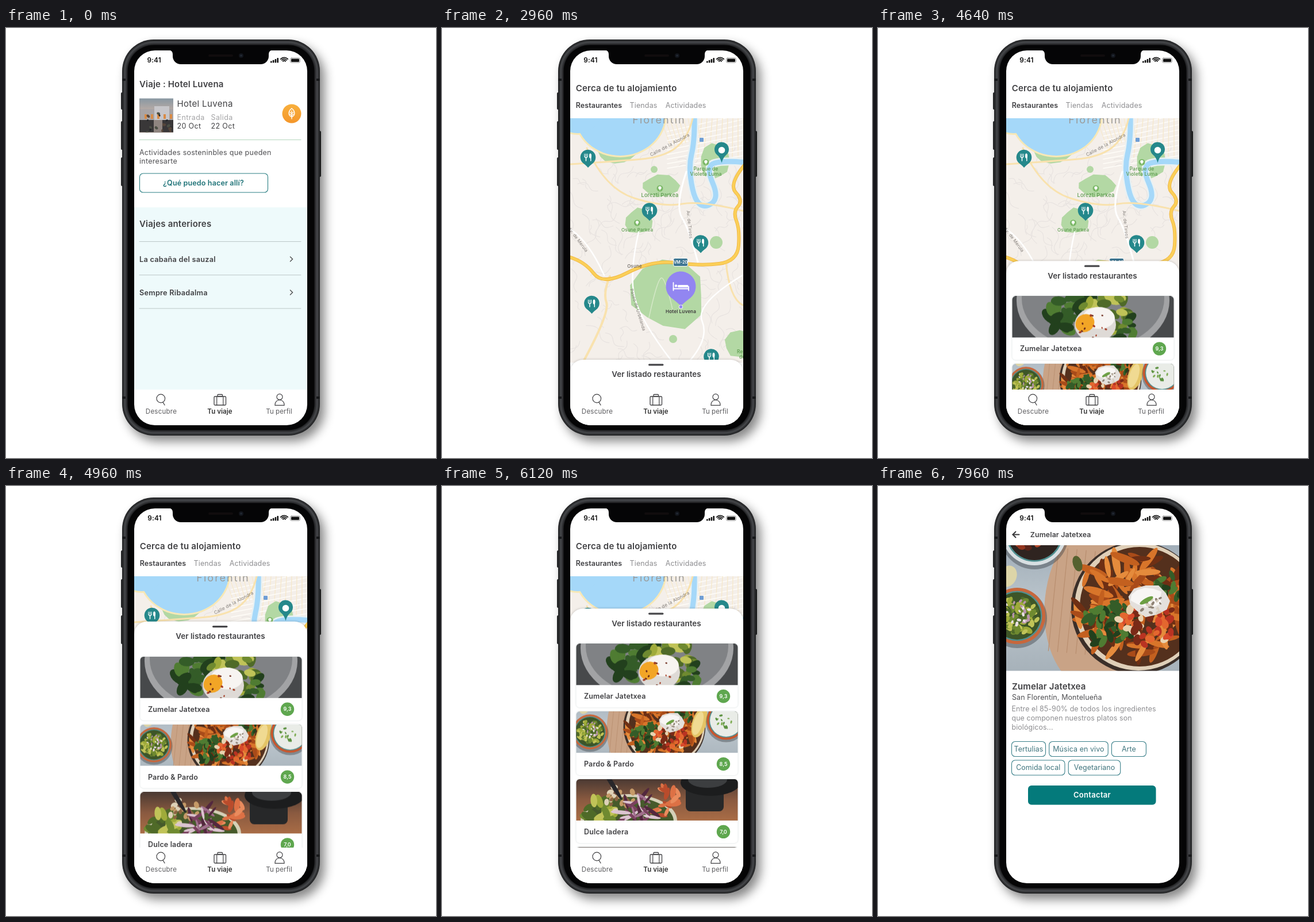
Recreate the animation shown at these times as an HTML page with a canvas. Size 748 by 748 pixels, loop 8000 ms.

```html
<!DOCTYPE html>
<html lang="es">
<head>
<meta charset="utf-8">
<title>Viaje</title>
<style>
html, body { margin: 0; width: 100%; height: 100%; overflow: hidden; background: #fff; }
canvas { display: block; width: 100vw; height: 100vh; }
</style>
</head>
<body>
<canvas id="stage" width="748" height="748"></canvas>
<script>
const SIZE = 748, LOOP = 8000, TAU = Math.PI * 2;
const LEFT = 223, TOP = 39, WIDTH = 301, HEIGHT = 652, RIGHT = LEFT + WIDTH;
const INK = '#414144', SOFT = '#505053', GREY = '#8e8e91', TEAL = '#1f7378';
const HOTEL = 'Hotel Luvena', PLACE = 'Zumelar Jatetxea';
let c = document.getElementById('stage').getContext('2d');

// ---------- helpers ----------
function layer(draw) {
  const canvas = document.createElement('canvas');
  canvas.width = canvas.height = SIZE;
  const previous = c;
  c = canvas.getContext('2d');
  c.lineCap = 'round';
  draw();
  c = previous;
  return canvas;
}
function scoped(draw) { c.save(); draw(); c.restore(); }
function seeded(seed) {
  let s = Math.floor(seed * 7919) % 2147483647;
  return () => (s = (s * 16807) % 2147483647) / 2147483647;
}
function text(s, x, y, size, color = INK, weight = 400, align = 'left', spacing = 0.15) {
  c.font = `${weight} ${size}px Inter, sans-serif`;
  c.letterSpacing = spacing + 'px';
  c.textAlign = align;
  c.fillStyle = color;
  c.fillText(s, x, y);
}
function fill(color) { c.fillStyle = color; c.fill(); }
function stroke(color, width) { c.strokeStyle = color; c.lineWidth = width; c.stroke(); }
function rect(x, y, w, h, color) { c.fillStyle = color; c.fillRect(x, y, w, h); }
function box(x, y, w, h, r) { c.beginPath(); c.roundRect(x, y, w, h, r); }
function arc(x, y, r, from = 0, to = TAU) { c.beginPath(); c.arc(x, y, r, from, to); }
function disc(x, y, r, color) { arc(x, y, r); fill(color); }
function oval(x, y, rx, ry, color, turn = 0) {
  c.beginPath(); c.ellipse(x, y, rx, ry, turn, 0, TAU); fill(color);
}
function line(x1, y1, x2, y2, color, width) {
  c.beginPath(); c.moveTo(x1, y1); c.lineTo(x2, y2); stroke(color, width);
}
function chevron(x, y, size, side, color, width) {
  c.beginPath();
  c.moveTo(x - side * size, y - size); c.lineTo(x, y); c.lineTo(x - side * size, y + size);
  stroke(color, width);
}
function shade(y1, y2, ...colors) {
  const g = c.createLinearGradient(0, y1, 0, y2);
  colors.forEach((color, i) => g.addColorStop(i / (colors.length - 1), color));
  return g;
}
// Smooth line through the key points' midpoints; points read "x,y x,y ...".
function road(points, color, width) {
  const p = points.split(' ').map(s => s.split(',').map(Number));
  const last = p.length - 1;
  c.beginPath();
  c.moveTo(...p[0]);
  for (let i = 1; i < last; i++) {
    const next = p[i + 1];
    const end = i + 1 === last ? next : [(p[i][0] + next[0]) / 2, (p[i][1] + next[1]) / 2];
    c.quadraticCurveTo(...p[i], ...end);
  }
  stroke(color, width);
}
function blob(x, y, rx, ry, color) {
  const rnd = seeded(x + y), corners = 11;
  c.beginPath();
  for (let i = 0; i < corners; i++) {
    const a = i / corners * TAU, k = 0.85 + rnd() * 0.3;
    c.lineTo(x + Math.cos(a) * rx * k, y + Math.sin(a) * ry * k);
  }
  fill(color);
}
// Seeded pile of slivers around a point, flattened a little.
function scatter(n, x, y, reach, size, slim, colors) {
  const rnd = seeded(n + x + y);
  for (let i = 0; i < n; i++) {
    const a = rnd() * TAU, d = Math.sqrt(rnd()) * reach, k = size * (0.6 + rnd() * 0.5);
    oval(x + Math.cos(a) * d, y + Math.sin(a) * d * 0.85, k, k * slim,
      colors[i % colors.length], rnd() * Math.PI);
  }
}

// ---------- phone ----------
function drawPhone() {
  rect(0, 0, SIZE, SIZE, '#fff');
  const side = '#28292b';
  box(200, 112, 5, 30, 2); fill(side);
  for (const y of [162, 225]) { box(200, y, 5, 50, 2); fill(side); }
  box(543, 179, 5, 80, 2); fill(side);
  scoped(() => {
    c.shadowColor = 'rgba(0,0,0,.48)';
    c.shadowBlur = 18;
    c.shadowOffsetX = 8;
    c.shadowOffsetY = 10;
    box(202, 20, 344, 689, 55); fill('#232426');
  });
  ['#303133', '#45474a', '#38393c', '#262729', '#050506'].forEach((color, i) => {
    const inset = 1.5 + i * 2;
    box(202 + inset, 20 + inset, 344 - inset * 2, 689 - inset * 2, 55 - inset); fill(color);
  });
  for (const y of [88, 641]) for (const x of [202, 540]) rect(x, y, 6, 4, '#17181a');
}
function drawNotch() {
  c.beginPath();
  c.moveTo(283, 38);
  c.quadraticCurveTo(290, 39, 290, 46);
  c.arcTo(290, 63, 307, 63, 14);
  c.arcTo(457, 63, 457, 46, 14);
  c.lineTo(457, 46);
  c.quadraticCurveTo(457, 39, 464, 38);
  fill('#050506');
  box(352, 46, 43, 4, 2); fill('#100c0d');
  disc(409, 48, 4, '#12151b');
  disc(409, 48, 1.8, '#232a35');
}
function drawStatus(x) {
  text('9:41', x, 60, 11.8, '#111', 600);
  for (let i = 0; i < 4; i++) { box(460 + i * 3.8, 57.5 - i * 1.8, 2.6, 3 + i * 1.8, 0.8); fill('#111'); }
  for (const r of [3.2, 5.9, 8.6]) { arc(484, 60, r, -Math.PI * 0.76, -Math.PI * 0.24); stroke('#111', 1.7); }
  box(494.6, 52.2, 16.8, 8, 2.2); stroke('#777', 0.8);
  box(496, 53.5, 14, 5.4, 1.2); fill('#111');
}
function drawNav() {
  rect(LEFT, 629, WIDTH, 62, '#fff');
  arc(269.3, 644.5, 7.3); stroke(INK, 1.2);
  line(273, 651, 276, 656, INK, 1.3);
  box(362, 641, 20.5, 15, 1.5); stroke(INK, 1.3);
  box(368, 637.5, 8.5, 3.5, 1); stroke(INK, 1.3);
  for (const x of [366.7, 377.8]) line(x, 641, x, 656, INK, 1.2);
  arc(476, 641.7, 5); stroke(INK, 1.2);
  box(468, 647, 16, 9.3, [8, 8, 0, 0]); stroke(INK, 1.2);
  text('Descubre', 270, 671, 11.5, '#5c5c5f', 400, 'center', 0.25);
  text('Tu viaje', 372, 671, 11.5, '#333', 600, 'center', 0.05);
  text('Tu perfil', 475, 671, 11.5, '#5c5c5f', 400, 'center', 0.1);
}

// ---------- home ----------
function drawHotelPhoto() {
  scoped(() => {
    box(232, 122.5, 59, 59, 0); c.clip();
    rect(232, 122, 59, 60, shade(122, 160, '#8797a2', '#b3a9a5', '#d8a987'));
    rect(232, 141, 59, 22, '#a8a4a5');
    rect(258, 136, 26, 27, '#c7c6ca');
    for (let x = 241; x < 290; x += 11) rect(x, 150, 4, 8, '#d98b45');
    rect(232, 160, 59, 22, '#393738');
    rect(257, 160, 15, 22, '#8f8580');
    scatter(18, 262, 172, 28, 3, 0.7, ['#24272a', '#57463a', '#4c5045']);
  });
}
function drawBadge(x, y) {
  disc(x, y, 16.5, shade(y - 17, y + 17, '#f8b03d', '#f4962a'));
  for (const side of [-1, 1]) {
    c.beginPath();
    c.moveTo(x, y - 9);
    c.bezierCurveTo(x + side * 7, y - 4, x + side * 6, y + 4, x, y + 5.5);
    stroke('#fff', 1.4);
    for (const d of [0, 3.5]) line(x, y + d, x + side * 3.5, y + d - 3, '#fff', 1.1);
  }
  line(x, y - 5, x, y + 9, '#fff', 1.3);
}
function drawHome() {
  rect(LEFT, TOP, WIDTH, HEIGHT, '#fff');
  rect(LEFT, 312, WIDTH, 320, '#eefafb');
  drawStatus(245.5);
  text(`Viaje : ${HOTEL}`, 232, 103, 15, INK, 600);
  drawHotelPhoto();
  text(HOTEL, 297.5, 136.5, 15, INK, 400, 'left', 0.35);
  [['Entrada', '20 Oct'], ['Salida', '22 Oct']].forEach(([label, date], i) => {
    const x = 297.5 + i * 59;
    text(label, x, 159.5, 12.5, '#a4a4a6', 400, 'left', 0.4);
    text(date, x, 175, 12.5, INK, 400, 'left', 0.35);
  });
  drawBadge(497, 149);
  line(232, 194.5, 513, 194.5, '#b3d6bd', 1);
  text('Actividades sosteninbles que pueden', 232, 221, 12.5, SOFT, 400, 'left', 0.25);
  text('interesarte', 232, 236, 12.5, SOFT, 400, 'left', 0.25);
  box(232.5, 253, 223, 33, 6); stroke('#2b7f83', 1.1);
  text('¿Qué puedo hacer allí?', 343.5, 273.5, 12.5, TEAL, 600, 'center');
  text('Viajes anteriores', 232, 346, 15, INK, 600, 'left', 0.2);
  for (let i = 0; i < 3; i++) line(232, 371.5 + i * 58.2, 513, 371.5 + i * 58.2, '#bcc7c8', 1);
  ['La cabaña del sauzal', 'Sempre Ribadalma'].forEach((name, i) => {
    const y = 402 + i * 58;
    text(name, 232, y + 4.7, 12.7, INK, 600, 'left', 0.25);
    chevron(498.5, y, 4, 1, '#555', 1.5);
  });
  drawNav();
}

// ---------- map ----------
const PARK = '#b3d8a4', WATER = '#a5d8f9', LEAF = '#5b9a4d', PIN = '#25888b', AMBER = '#f9e2ae';

function drawStreets() {
  const rnd = seeded(71);
  for (let i = 0; i < 150; i++) {
    const x = LEFT + rnd() * WIDTH, y = 215 + rnd() * 365, a = rnd() * TAU, d = 10 + rnd() * 22;
    const at = (turn, k) => [x + Math.cos(a + turn) * d * k, y + Math.sin(a + turn) * d * k];
    c.beginPath();
    c.moveTo(x, y);
    c.bezierCurveTo(...at(0, 1), ...at(1.4, 1), ...at(0.5, 1.6));
    stroke('#e8e3e0', 1.2);
  }
  for (let i = 0; i < 9; i++) {
    line(380 + i * 8, 157, 400 + i * 6, 212 - i * 3, '#f7ead0', 1.4);
    line(452 + i * 9, 157, 445 + i * 10, 225, '#f6e8cc', 1.4);
    line(392, 180 + i * 8, RIGHT, 150 + i * 9, '#fffdf8', 1.4);
  }
}
function drawWater() {
  const bay = [[310, 150, 78, 72], [236, 150, 40, 33]];
  for (const [x, y, rx, ry] of bay) oval(x, y, rx + 3, ry + 3, '#f7e8b6');
  for (const shape of bay) oval(...shape, WATER);
  for (const [color, width] of [['#e9f1f3', 14], [WATER, 9]]) {
    road('439,150 440,195 428,245 444,316 484,300 458,240 490,230 530,234', color, width);
  }
}
function drawRoads() {
  road('223,237 300,232 385,225 428,192 436,157', AMBER, 3);
  road('252,209 284,280 385,312 450,300 523,318', AMBER, 3);
  road('292,432 280,460 292,495 246,580', AMBER, 4);
  road('494,408 500,470 523,482', AMBER, 3);
  road('425,250 405,310 430,350 445,407', '#fff', 3);
  road('223,350 255,370 282,430', '#fff', 2.5);
  road('342,355 325,430 346,510 400,580', '#fff', 2.5);
  road('523,430 440,480 465,540 430,580', '#fff', 2.5);
  road('360,504 376,430 390,440 402,494', '#d5e8c8', 1.5);
  for (const [color, width] of [['#eeb23d', 6], ['#fbcf58', 4.4]]) {
    road('220,398 248,406 280,448 366,403 450,414 514,406 518,350 506,320 524,300 498,272 528,236', color, width);
  }
}
function tilted(s, x, y, degrees, size = 7.6) {
  scoped(() => {
    c.translate(x, y);
    c.rotate(degrees * Math.PI / 180);
    text(s, 0, 3, size, '#837e7a', 400, 'center', 0.2);
  });
}
function parkLabel(s, x, y, size) {
  disc(x, y - 14.5, 5.5, '#7cb868');
  disc(x, y - 15.5, 2.7, '#fff');
  rect(x - 0.6, y - 15, 1.2, 4, '#fff');
  s.split('\n').forEach((row, i) => text(row, x, y + i * 9.3, size, LEAF, 500, 'center'));
}
function drop(x, y, r, tip, color) {
  c.beginPath();
  c.arc(x, y, r, Math.PI * 0.72, Math.PI * 0.28);
  c.quadraticCurveTo(x + r * 0.2, y + r * 1.1, x, y + tip);
  c.quadraticCurveTo(x - r * 0.2, y + r * 1.1, x - r * 0.72, y + r * 0.7);
  fill(color);
}
function foodPin(x, y) {
  drop(x, y, 13.3, 18, PIN);
  for (const d of [-6, -3.5, -1]) line(x + d, y - 6, x + d, y - 2, '#fff', 1.1);
  arc(x - 3.5, y - 2, 2.5, 0, Math.PI); stroke('#fff', 1.2);
  line(x - 3.5, y, x - 3.5, y + 6, '#fff', 1.5);
  oval(x + 4, y - 2.5, 2, 4.2, '#fff');
  line(x + 4.8, y, x + 4.8, y + 6, '#fff', 1.5);
}
function hotelPin(x, y) {
  const purple = '#9286f1';
  drop(x, y, 26, 34, purple);
  disc(x, y + 35.5, 3.6, '#fff');
  disc(x, y + 35.5, 2.8, purple);
  for (const [side, rise] of [[-13, -6.5], [13.5, 0.5]]) line(x + side, y + rise, x + side, y + 7, '#fff', 1.8);
  line(x - 13, y + 4, x + 13, y + 4, '#fff', 2);
  disc(x - 8.5, y - 1, 2.2, '#fff');
  box(x - 5.5, y - 2.5, 18.5, 4.3, 1.5); fill('#fff');
  text(HOTEL, x, y + 46, 8.2, '#3d3a3c', 600, 'center', 0.1);
}
function drawMap() {
  c.beginPath(); c.rect(LEFT, 157, WIDTH, 425); c.clip();
  rect(LEFT, 157, WIDTH, 425, '#f4efea');
  drawStreets();
  blob(305, 220, 32, 16, PARK);
  blob(380, 274, 34, 18, PARK);
  blob(344, 336, 25, 22, PARK);
  blob(473, 232, 26, 32, PARK);
  blob(393, 465, 64, 58, PARK);
  blob(522, 550, 30, 26, PARK);
  disc(477, 373, 11, PARK);
  disc(369, 246, 6, PARK);
  disc(402, 541, 7, PARK);
  drawWater();
  drawRoads();

  text('Florentín', 377.5, 166, 18, '#9b9a98', 400, 'center', 2);
  tilted('Calle de la Alondra', 396, 203, -28, 8.2);
  tilted('Av. de Merula', 237, 368, 53);
  tilted('Av. de Tirsos', 431, 342, 84);
  tilted('Paseo de Urbelanda', 341, 490, 73);
  parkLabel('Parque de\nVioleta Luma', 459, 248, 8.6);
  parkLabel('Lorezti Parkea', 379, 293.5, 9.2);
  parkLabel('Osune Parkea', 339.5, 353.5, 8);
  text('Re', 513, 565.5, 8.3, LEAF, 500);
  text('de', 517, 574.5, 8.3, LEAF, 500);
  text('Osune', 335, 416.5, 8, '#66615d', 500, 'center');
  box(448, 191, 7, 7, 1); fill('#6f9ed5');
  box(402.5, 400.5, 25, 14, 2.5); fill('#3e7692');
  stroke('#fff', 1);
  text('VM-20', 415, 410.3, 7.2, '#fff', 600, 'center', 0);

  for (const [x, y] of [[254, 225], [361, 317.5], [450, 373.5], [260.5, 479], [468.5, 571.5]]) foodPin(x, y);
  drop(486.5, 211, 12.5, 23.5, PIN);
  disc(486.5, 212.5, 5.8, '#fff');
  hotelPin(415.5, 449.5);
}

// ---------- food pictures ----------
const FRIES = ['#d8752a', '#a94b19', '#e58b3c', '#6e2f14', '#c3601f'];
const HERBS = ['#345c28', '#4f7c32', '#22401d'];
const AVOCADO = ['#9fab3a', '#6f8a30', '#c0c358', '#4f6a28'];

function drawEggPlate() {
  rect(233, 0, 282, 72, '#47494b');
  oval(374, 8, 133, 96, '#a2a3a5');
  oval(374, 4, 124, 88, '#808285');
  scatter(30, 345, 36, 48, 15, 0.6, HERBS);
  scatter(34, 400, 24, 45, 14, 0.6, AVOCADO);
  scatter(10, 420, 58, 32, 12, 0.6, HERBS);
  oval(378, 50, 36, 30, '#dedad6');
  oval(384, 38, 28, 19, '#f7f4f1');
  oval(360, 47, 17, 15, '#f2a526', -0.6);
  scatter(14, 376, 50, 30, 2.3, 0.7, ['#a33a22', '#6c2a1a']);
}
function drawBowl(x, y, r, rim, inside) {
  disc(x, y + 4, r + 3, 'rgba(50,55,60,.4)');
  disc(x, y, r, rim);
  disc(x, y, r * 0.89, '#4f8f90');
  disc(x, y, r * 0.84, inside);
}
// Wide table scene, shared by a card and the detail header.
function drawTable() {
  rect(190, 90, 480, 240, shade(90, 330, '#9eabb6', '#bcc6cd', '#a5b0b8'));
  scoped(() => {
    c.translate(385, 205);
    c.rotate(0.1);
    oval(0, 0, 95, 150, '#c9a386');
    for (let x = -80; x < 0; x += 16) line(x, -90, x, 90, '#b98f70', 1.3);
  });
  drawBowl(272, 82, 56, '#d8dfe2', '#2f2420');
  scatter(20, 272, 95, 36, 8, 0.7, ['#93351f', '#b64a2c', '#5a2419']);
  oval(226, 157, 15, 19, '#ddd5a8', 0.4);
  drawBowl(242, 226, 49, '#c8673c', '#3d5528');
  scatter(70, 242, 226, 36, 8, 0.6, AVOCADO);
  scatter(22, 243, 220, 26, 4, 0.6, ['#e9dfe5', '#b995ad']);
  disc(451, 212, 115, '#3b2f29');
  disc(453, 210, 111, '#dfcfb8');
  disc(455, 210, 104, '#54301d');
  scatter(120, 446, 205, 102, 25, 0.25, FRIES);
  scatter(45, 402, 240, 46, 12, 0.5, HERBS);
  scatter(50, 468, 238, 50, 9, 0.7, ['#d94a2b', '#e4672f', '#b93322', '#e9d2b0', '#7a2a17']);
  scatter(16, 505, 178, 30, 11, 0.45, HERBS);
  blob(471, 200, 36, 26, '#e4e0dc');
  blob(468, 194, 27, 17, '#f8f6f4');
  scatter(18, 478, 208, 24, 4, 0.6, ['#d8cfc0', '#8f8376']);
  oval(467, 199, 13, 4, '#6c9f43', -0.5);
  oval(347, 135, 8, 14, '#55612f', -0.3);
  oval(549, 200, 20, 43, '#e4c466', 0.3);
  oval(545, 202, 13, 34, '#f0da92', 0.3);
  drawBowl(624, 194, 54, '#c9552c', '#e9ece7');
  scatter(12, 616, 198, 24, 5, 0.55, ['#5a913f', '#7dab52']);
}
function drawTableCard() {
  const k = 0.62;
  c.translate(258 - 243 * k, 35 - 225 * k);
  c.scale(k, k);
  drawTable();
}
function drawSalad() {
  rect(233, 0, 282, 72, shade(0, 72, '#4b3a33', '#8a5a40', '#a96c46'));
  box(424, -20, 66, 76, 8); fill('#272829');
  oval(467, 6, 52, 23, '#1c1d1e');
  oval(462, 1, 34, 14, '#3c3e40');
  oval(325, 72, 84, 46, '#d5d0b8');
  oval(325, 74, 78, 43, '#465a2b');
  scatter(24, 276, 56, 28, 13, 0.5, AVOCADO);
  scatter(16, 384, 36, 32, 13, 0.4, ['#dd7145', '#e98b5d', '#b94c2c']);
  scatter(22, 310, 34, 26, 6, 0.7, ['#c59a68', '#8a6341', '#ded1b7']);
  scatter(26, 344, 56, 34, 16, 0.2, ['#7a415f', '#dcc4d0', '#a06f8c', '#53283e']);
  oval(295, 7, 4, 34, '#29272a', -0.55);
}

// ---------- list ----------
const CARDS = [
  [PLACE, '9,3', drawEggPlate],
  ['Pardo & Pardo', '8,5', drawTableCard],
  ['Dulce ladera', '7,0', drawSalad],
  ['', '', () => rect(233, 0, 282, 72, '#77706c')]
].map(([name, score, paint]) => ({
  name, score,
  picture: layer(() => { box(233.5, 0, 281, 72, [6, 6, 0, 0]); c.clip(); paint(); })
}));

function drawCard({ name, score, picture }, y) {
  scoped(() => {
    c.shadowColor = 'rgba(60,90,90,.22)';
    c.shadowBlur = 3;
    box(233.5, y, 281, 111, 6); fill('#fff');
  });
  c.drawImage(picture, 0, y);
  text(name, 247, y + 96, 12.5, INK, 600);
  if (!score) return;
  disc(489.5, y + 91.5, 11.7, '#5fa74f');
  text(score, 489.5, y + 94.7, 9, '#fff', 600, 'center', 0);
}
function drawListHeader() {
  rect(LEFT, TOP, WIDTH, HEIGHT, '#fff');
  drawStatus(246.3);
  text('Cerca de tu alojamiento', 232.8, 109.5, 15, INK, 600, 'left', 0.2);
  text('Restaurantes', 232.8, 139, 12.5, INK, 600, 'left', 0.05);
  text('Tiendas', 326.5, 139, 12.5, GREY);
  text('Actividades', 388.8, 139, 12.5, GREY);
  drawMap();
}
function drawList(top) {
  c.drawImage(listBack, 0, 0);
  scoped(() => {
    c.shadowColor = 'rgba(0,0,0,.22)';
    c.shadowBlur = 4;
    box(LEFT, top, WIDTH, HEIGHT, 22); fill('#fff');
  });
  box(359, top + 7.2, 26.5, 3.2, 1.6); fill('#47474a');
  text('Ver listado restaurantes', 373, top + 30.3, 13.4, INK, 600, 'center', 0.05);
  CARDS.forEach((card, i) => {
    const y = top + 61 + i * 117.8;
    if (y < 629) drawCard(card, y);
  });
  drawNav();
}

// ---------- detail ----------
function drawDetail() {
  rect(LEFT, TOP, WIDTH, HEIGHT, '#fff');
  drawStatus(246.3);
  line(234.5, 84.5, 245.5, 84.5, '#38383b', 2);
  chevron(234.5, 84.5, 5, -1, '#38383b', 2);
  text(PLACE, 264.8, 89, 12.3, INK, 600);
  scoped(() => {
    c.beginPath(); c.rect(LEFT, 103, WIDTH, 218.5); c.clip();
    drawTable();
  });
  text(PLACE, 233, 353.5, 15, INK, 600);
  text('San Florentín, Montelueña', 233, 372.3, 12.5, SOFT, 400, 'left', 0.1);
  ['Entre el 85-90% de todos los ingredientes', 'que componen nuestros platos son', 'biológicos...']
    .forEach((s, i) => text(s, 232.5, 391.8 + i * 16.3, 12.4, GREY, 400, 'left', 0.1));
  const rows = [
    [['Tertulias', 59], ['Música en vivo', 102.5], ['Arte', 60]],
    [['Comida local', 92.5], ['Vegetariano', 90.5]]
  ];
  rows.forEach((row, i) => {
    let x = 232.5;
    const y = 444.5 + i * 32.5;
    for (const [label, w] of row) {
      box(x, y, w, 26, 6); stroke('#397f89', 1.1);
      text(label, x + w / 2, y + 17.2, 12.4, '#3f747d', 400, 'center', 0.1);
      x += w + 6.2;
    }
  });
  box(261, 521, 222.5, 33.5, 6); fill('#047a7b');
  text('Contactar', 372.5, 542.2, 13, '#fff', 600, 'center', 0.3);
}

// ---------- timeline ----------
const [phone, home, listBack, detail] = [drawPhone, drawHome, drawListHeader, drawDetail].map(layer);
const progress = (t, start, end) => Math.min(1, Math.max(0, (t - start) / (end - start)));
const ease = p => (1 - Math.cos(Math.PI * p)) / 2;
c.lineCap = 'round';

function overlay(image, alpha) {
  c.globalAlpha = alpha;
  c.drawImage(image, 0, 0);
  c.globalAlpha = 1;
}
function render(t) {
  const toList = ease(progress(t, 2400, 2700));
  const lift = ease(progress(t, 4210, 5104));
  const toDetail = ease(progress(t, 7200, 7500));
  c.drawImage(phone, 0, 0);
  scoped(() => {
    box(LEFT, TOP, WIDTH, HEIGHT, 36); c.clip();
    if (toList > 0 && toDetail < 1) drawList(577 - 363.7 * lift);
    if (toList < 1) overlay(home, 1 - toList);
    if (toDetail > 0) overlay(detail, toDetail);
  });
  drawNotch();
}
function tick(now) {
  render(now % LOOP);
  requestAnimationFrame(tick);
}
render(0);
requestAnimationFrame(tick);
</script>
</body>
</html>
```
